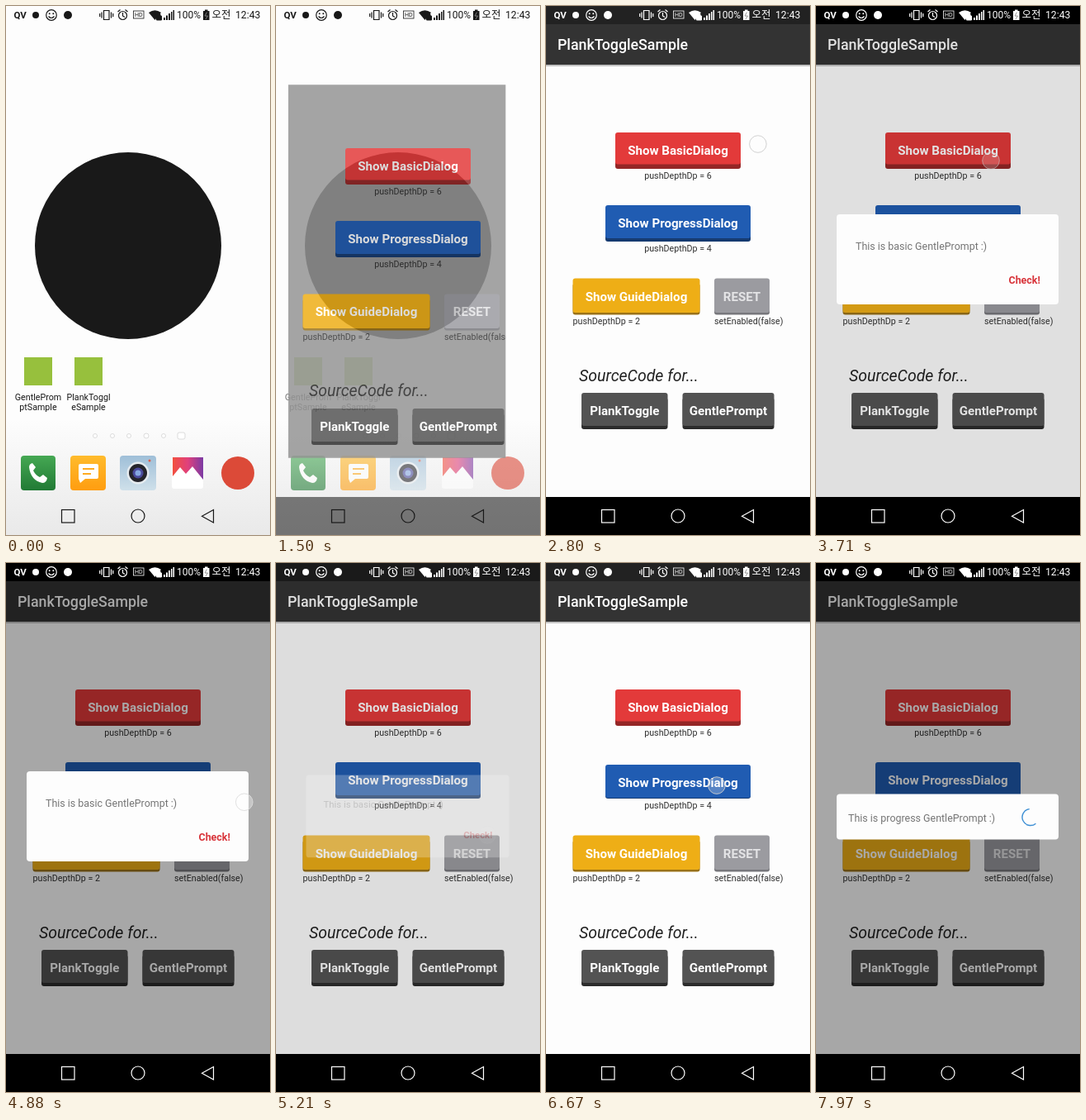
An HTML page that plays this animation: 320 px wide and 640 px high, repeating every 8000 ms.

```html
<!DOCTYPE html>
<html lang="en">
<head>
<meta charset="utf-8">
<title>Dialog demo</title>
<style>
  html, body { margin: 0; width: 100%; height: 100%; overflow: hidden; background: #fdfdfd; }
  svg { display: block; width: 100%; height: 100%; font-family: Roboto, "Noto Sans CJK KR", "Noto Sans CJK", sans-serif; }
  .mid { text-anchor: middle; }
  .label { font-size: 10.7px; fill: #303030; }
  .btn { font-size: 15.1px; font-weight: 700; text-anchor: middle; }
  .msg { font-size: 12.44px; fill: #757575; }
  .line { fill: none; stroke: currentColor; stroke-width: 1.2; }
</style>
</head>
<body>
<svg viewBox="0 0 320 640">
  <defs>
    <linearGradient id="fade" x2="0" y2="1"><stop stop-color="#fdfdfd"/><stop offset="1" stop-color="#e9e9e9"/></linearGradient>
    <linearGradient id="green" x2="0" y2="1"><stop stop-color="#45a853"/><stop offset="1" stop-color="#217a35"/></linearGradient>
    <linearGradient id="amber" x2="0" y2="1"><stop stop-color="#ffbb2c"/><stop offset="1" stop-color="#ff9d10"/></linearGradient>
    <linearGradient id="sky" x2="0" y2="1"><stop stop-color="#9fbfd8"/><stop offset="1" stop-color="#cfe0ea"/></linearGradient>
    <linearGradient id="berry" x2="1"><stop stop-color="#f2503f"/><stop offset=".5" stop-color="#e0407c"/><stop offset="1" stop-color="#7b3aa4"/></linearGradient>
    <clipPath id="reveal"><rect id="hole"/></clipPath>
  </defs>

  <rect width="320" height="640" fill="#fdfdfd"/>
  <rect y="500" width="320" height="140" fill="url(#fade)"/>
  <circle cx="148" cy="290" r="113" fill="#191919"/>
  <g id="icons">
    <g fill="#97c03d">
      <rect x="22" y="425" width="34" height="34"/>
      <rect x="83" y="425" width="34" height="34"/>
    </g>
    <g class="label mid" style="fill:#181818">
      <text x="39" y="477">GentleProm</text><text x="39" y="489">ptSample</text>
      <text x="100" y="477">PlankToggl</text><text x="100" y="489">eSample</text>
    </g>
    <g fill="#fff" stroke="#d4d4d4" stroke-width=".8">
      <circle cx="108" cy="520" r="2.5"/><circle cx="129" cy="520" r="2.5"/><circle cx="149" cy="520" r="2.5"/>
      <circle cx="170" cy="520" r="3"/><circle cx="191" cy="520" r="2.5"/>
      <rect x="208" y="516" width="9" height="8" rx="2"/>
    </g>
    <rect x="18" y="544" width="42" height="42" rx="4" fill="url(#green)"/>
    <path d="M32 553l4 5-3 4q3 6 8 8l4-3 5 4q-1 6-6 6Q30 574 28 558q0-4 4-5z" fill="#fff"/>
    <rect x="78" y="544" width="43" height="42" rx="4" fill="url(#amber)"/>
    <path d="M90 554h20q2 0 2 2v14q0 2-2 2H96l-6 5-2-5V556q0-2 2-2z" fill="#fff"/>
    <path d="M93 560h14M93 566h10" stroke="#ffab20" stroke-width="2"/>
    <rect x="138" y="544" width="44" height="42" rx="4" fill="url(#sky)"/>
    <circle cx="174" cy="550" r="1.5" fill="#e0604c"/>
    <circle cx="160" cy="565" r="13.5" fill="#e6ecf0"/><circle cx="160" cy="565" r="11" fill="#25252c"/>
    <circle cx="160" cy="565" r="6.5" fill="#4a4a9c"/><circle cx="160" cy="565" r="3.5" fill="#86a8e0"/>
    <rect x="201" y="546" width="38" height="38" rx="3" fill="#fff"/>
    <path d="M202 546H239V573L226 557L218 566L211 558L202 569z" fill="url(#berry)"/>
    <circle cx="281" cy="565" r="20" fill="#dc4a38"/>
  </g>

  <g clip-path="url(#reveal)" id="win">
    <g id="app">
      <rect y="-60" width="320" height="720" fill="#fdfdfd"/>
      <rect id="shade" y="-60" width="320" height="720"/>
      <rect y="71" width="320" height="2" fill="#c4c4c4"/>
      <rect width="320" height="71" fill="#333"/>
      <text x="14" y="53" font-size="17.8" font-weight="500" fill="#fff">PlankToggleSample</text>
      <g id="buttons"></g>
      <g class="label">
        <text x="160" y="209" class="mid">pushDepthDp = 6</text>
        <text x="160" y="297" class="mid">pushDepthDp = 4</text>
        <text x="32.5" y="385">pushDepthDp = 2</text>
        <text x="204" y="385">setEnabled(false)</text>
      </g>
      <text x="40" y="453.5" font-size="19.5" font-style="italic" fill="#222">SourceCode for...</text>
    </g>
  </g>

  <rect id="dim" y="22" width="320" height="572"/>
  <rect id="statusBg" width="320" height="22" fill="#222"/>
  <rect id="statusDim" width="320" height="22"/>
  <g id="status" fill="currentColor">
    <text x="9.5" y="15" font-size="11.5" font-weight="700">QV</text>
    <circle cx="36" cy="11" r="4"/>
    <circle cx="55" cy="11" r="6.3" class="line"/>
    <circle cx="52.7" cy="9.3" r="1"/><circle cx="57.3" cy="9.3" r="1"/>
    <path class="line" d="M51.5 12.5q3.500 4 7 0"/>
    <circle cx="75" cy="11" r="5"/>
    <path class="line" d="M118.5 5.5h6.500v11h-6.500zM116 7.500v7M127.500 7.500v7M113.700 9v4M129.800 9v4"/>
    <path class="line" d="M141.5 8v4l2.500 1.500M135.500 7l3-2.500M147.500 7l-3-2.500"/>
    <circle cx="141.5" cy="11.5" r="5" class="line"/>
    <rect x="154.5" y="6" width="12.5" height="9" class="line" style="stroke-width:.8"/>
    <text x="160.8" y="13" font-size="7" class="mid">HD</text>
    <path d="M173 8q7.500-5.500 15 0l-7.500 9z"/>
    <path d="M182.5 12h6v5h-6zM184 12v-2q1.500-1.500 3 0v2" stroke="currentColor"/>
    <path d="M191 14h2v3h-2zM194 11.500h2V17h-2zM197 9h2v8h-2zM200 7h1.500v10H200zM202.500 5h1.500v12h-1.500z"/>
    <text x="207" y="15" font-size="12">100%</text>
    <path d="M239 6h2V4.500h3.500V6h2v11H239z"/>
    <path d="M243.500 7.500l-2.500 4.500h3.500l-2.500 4" fill="none" stroke="#888" stroke-width=".9"/>
    <text x="249.5" y="15" font-size="12.5">오전</text>
    <text x="278" y="15" font-size="12.2">12:43</text>
  </g>

  <circle id="touch" r="10.3" fill="#fff" fill-opacity=".25" stroke="#ccc" stroke-width=".9"/>

  <g id="basic">
    <rect x="25" y="252" width="269" height="109" rx="4" fill="#fdfdfd"/>
    <text x="48" y="295" class="msg">This is basic GentlePrompt :)</text>
    <text x="233.5" y="335.5" font-size="12.44" font-weight="700" fill="#d8343a">Check!</text>
  </g>
  <g id="progress">
    <rect x="25" y="279.5" width="269" height="55" rx="4" fill="#fdfdfd"/>
    <text x="39" y="312.5" class="msg">This is progress GentlePrompt :)</text>
    <path id="spinner" fill="none" stroke="#3d8fd4" stroke-width="1.4"/>
  </g>
  <circle id="touchTop" r="10.3" fill="#fff" fill-opacity=".35" stroke="#ddd" stroke-width=".9"/>

  <rect id="navBg" y="594" width="320" height="46"/>
  <g id="nav" class="line">
    <rect x="67.5" y="609.5" width="15.5" height="15.5"/>
    <circle cx="160" cy="617" r="8"/>
    <path d="M251.5 609.5v15.500l-14-7.750z"/>
  </g>
</svg>

<script>
const LOOP = 8000;
const $ = id => document.getElementById(id);
const set = (id, attrs) => { for (const k in attrs) $(id).setAttribute(k, attrs[k]); };
const ramp = (t, a, b) => Math.min(1, Math.max(0, (t - a) / (b - a)));
const ease = x => x * x * (3 - 2 * x);
const pulse = (t, a, b, c, d) => ramp(t, a, b) * (1 - ramp(t, c, d));

// keys: [time, ...values], linear between neighbours
function along(t, keys) {
  let i = 0;
  while (i < keys.length - 2 && t >= keys[i + 1][0]) i++;
  const [a, b] = [keys[i], keys[i + 1]];
  const p = ramp(t, a[0], b[0]);
  return a.slice(1).map((v, n) => v + (b[n + 1] - v) * p);
}

// label, x, y, width, depth, face, edge, text colour
const buttons = [
  ['Show BasicDialog', 84, 153, 152, 5.5, '#e33a3a', '#942626', '#fff'],
  ['Show ProgressDialog', 72, 241, 176, 4, '#205cb2', '#153a70', '#fff'],
  ['Show GuideDialog', 32.5, 329.5, 154, 2.5, '#eeae16', '#9a7218', '#fff'],
  ['RESET', 204, 329.5, 67, 2.5, '#9b9ba0', '#77777c', '#e4e4e6'],
  ['PlankToggle', 43, 468, 104.5, 4, '#535353', '#2c2c2c', '#fff'],
  ['GentlePrompt', 165.5, 468, 111, 4, '#535353', '#2c2c2c', '#fff']
];
$('buttons').innerHTML = buttons.map(([label, x, y, w, depth, face, edge, ink], i) => `
  <rect x="${x}" y="${y + 6}" width="${w}" height="38" rx="3" fill="${edge}"/>
  <g id="face${i}">
    <rect x="${x}" y="${y}" width="${w}" height="${44 - depth}" rx="3" fill="${face}"/>
    <text class="btn" x="${x + w / 2}" y="${y + 27}" fill="${ink}">${label}</text>
  </g>`).join('');

const windowRect = [[1290, 76, 424, 124, 470], [1500, 15, 96, 278, 546], [1620, 0, 0, 320, 640]];
const touches = [
  [[1170, 100, 446], [1290, 100, 446]],
  [[2440, 290, 130], [2800, 257, 167], [3240, 214, 185], [3680, 212, 187]],
  [[4300, 300, 250], [4880, 289, 289], [5040, 256, 328], [5120, 256, 329]],
  [[5440, 298, 180], [6220, 285, 231], [6520, 208, 268], [6800, 206, 270]]
];

function drawTouch(t) {
  let x = 0, y = 0, alpha = 0;
  for (const path of touches) {
    const from = path[0][0], to = path[path.length - 1][0];
    if (t < from || t > to + 100) continue;
    [x, y] = along(t, path);
    alpha = pulse(t, from, from + 60, to, to + 100);
  }
  const above = t > 4000 && t < 5300;
  set('touch', { cx: x, cy: y, opacity: above ? 0 : alpha });
  set('touchTop', { cx: x, cy: y, opacity: above ? alpha : 0 });
}

function drawDialog(id, t, start, end) {
  const p = pulse(t, start, start + 120, end, end + 120);
  const s = 0.9 + 0.1 * ease(p);
  set(id, { opacity: p, transform: `translate(160 306) scale(${s}) translate(-160 -306)` });
  return p;
}

function drawSpinner(t) {
  const k = (t - 7970) / 1333 + 0.33, turn = Math.floor(k), f = k - turn;
  const head = 0.04 + 0.75 * ease(ramp(f, 0, 0.5));
  const tail = 0.75 * ease(ramp(f, 0.5, 1));
  const base = 50 + (t - 7970) * 0.108 + 270 * turn;
  const point = deg => {
    const a = deg * Math.PI / 180;
    return `${260 + 10 * Math.cos(a)} ${307.5 + 10 * Math.sin(a)}`;
  };
  const large = head - tail > 0.5 ? 1 : 0;
  set('spinner', { d: `M${point(base + 360 * tail)}A10 10 0 ${large} 1 ${point(base + 360 * head)}` });
}

function draw(t) {
  const [l, top, r, b] = along(t, windowRect);
  set('hole', { x: l, y: top, width: r - l, height: b - top });
  set('win', { opacity: t < 1290 ? 0 : along(t, [[1290, 0.2], [1500, 0.84], [1600, 1]])[0] });
  set('app', { transform: `translate(0 ${along(t, [[1290, 50], [1500, 19], [1680, 0]])[0]})` });
  set('shade', { opacity: along(t, [[1290, 0.7], [1500, 0.42], [1730, 0]])[0] });
  set('icons', { opacity: 1 - ramp(t, 1330, 1750) });

  const inApp = t >= 1580;
  set('statusBg', { opacity: ramp(t, 1560, 1640) });
  set('status', { color: inApp ? '#fff' : '#181818' });
  set('navBg', { opacity: ramp(t, 1400, 1600) });
  set('nav', { color: inApp ? '#fff' : '#181818' });

  set('face0', { transform: `translate(0 ${4.5 * pulse(t, 3300, 3340, 3500, 3540)})` });
  set('face1', { transform: `translate(0 ${3 * pulse(t, 6550, 6590, 6690, 6730)})` });

  const open = drawDialog('basic', t, 3570, 5120) + drawDialog('progress', t, 6740, LOOP);
  set('dim', { opacity: 0.34 * (pulse(t, 3630, 3870, 5110, 5270) + ramp(t, 6800, 7030)) });
  set('statusDim', { opacity: open });
  drawSpinner(t);
  drawTouch(t);
}

const began = performance.now();
function tick() {
  draw((performance.now() - began) % LOOP);
  requestAnimationFrame(tick);
}
tick();
</script>
</body>
</html>
```
